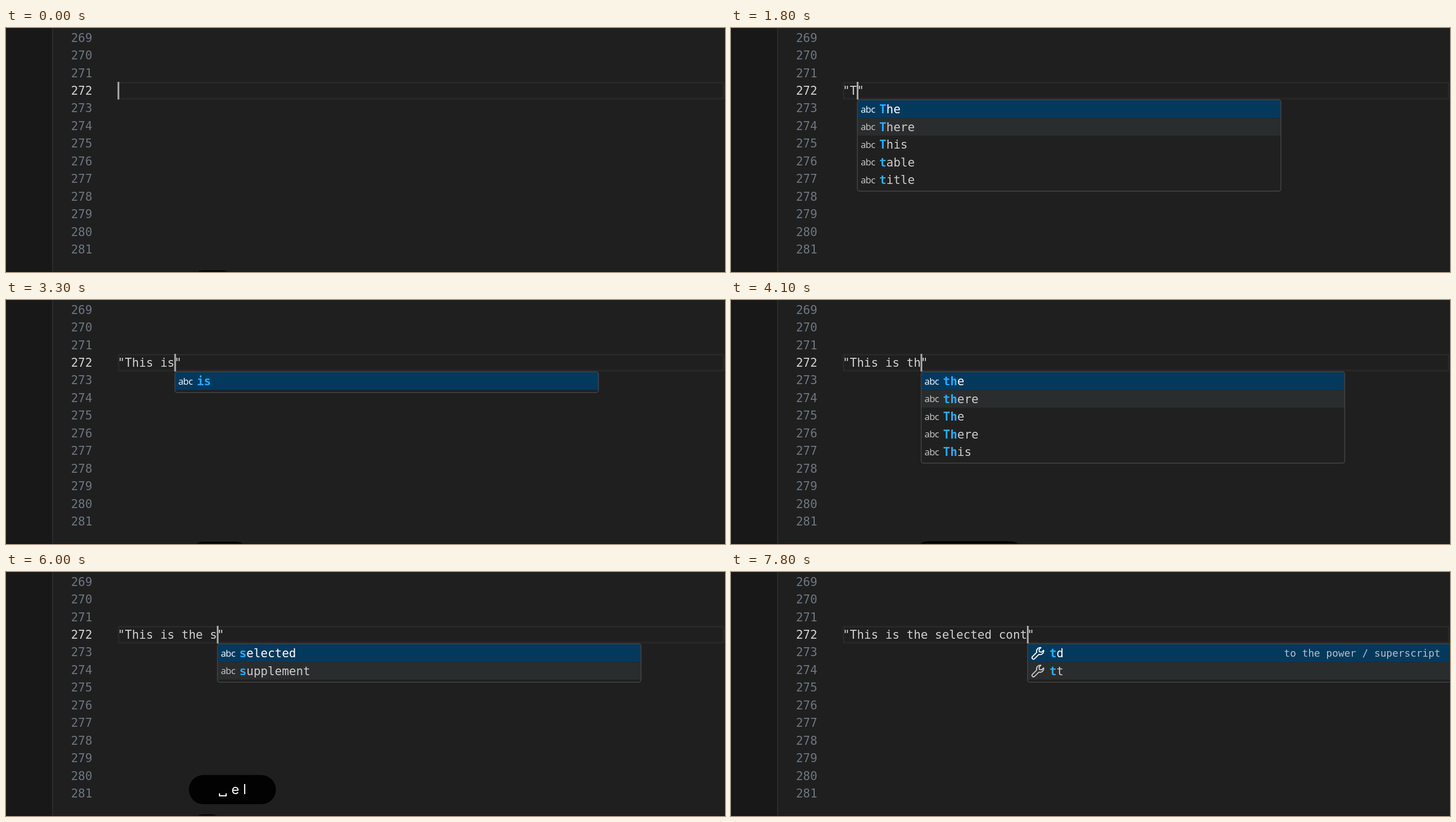
These frames come from a looping animation (1280x435 px, 8 s). An HTML page:

```html
<!DOCTYPE html>
<html lang="en">
<head>
<meta charset="utf-8">
<title>Editor completion</title>
<style>
html, body { margin: 0; width: 100%; height: 100%; overflow: hidden; background: #1f1f1f; }
svg { display: block; width: 100vw; height: 100vh; }
text { white-space: pre; }
.code { font: 20.97px "DejaVu Sans Mono", "Noto Sans CJK SC", "Noto Sans CJK", monospace; }
.abc { font: 16.5px "Open Sans", "Noto Sans", sans-serif; letter-spacing: -.5px; }
.hit { font-weight: bold; fill: #2aaaff; }
.info { font: 17.8px "DejaVu Sans Mono", monospace; fill: #b4c0ca; text-anchor: end; }
.key { font: 24px "Inter", sans-serif; fill: #fff; }
</style>
</head>
<body>
<svg viewBox="0 0 1280 435" preserveAspectRatio="none">
  <rect width="1280" height="435" fill="#1f1f1f"/>
  <rect width="82" height="435" fill="#181818"/>
  <rect x="82" width="2" height="435" fill="#2b2b2b"/>
  <rect x="200.5" y="97.5" width="1077" height="28.5" fill="none" stroke="#282828" stroke-width="3"/>
  <g id="numbers" class="code"></g>
  <text id="line" class="code" x="199" y="119" fill="#d0d0d0"></text>
  <rect id="caret" y="96" width="3" height="31.5" fill="#aeafad"/>
  <g id="popup"></g>
  <g id="keys"></g>
  <rect y="434" width="1280" height="1" fill="#151515"/>
</svg>
<script>
const LOOP = 8000, STEP = 12.625, ROW = 31.46;
const $ = id => document.getElementById(id);
const esc = s => s.replace(/&/g, '&amp;').replace(/</g, '&lt;');

// [time, typed text, suggestions, wrench icons, detail]; square marks show matches as ‹›
const states = [
  [0, null],
  [300, ''],
  [1000, 'Y'],
  [1200, 'Y', '‹y› ‹y›label ‹y›轴标签'],
  [1500, ''],
  [1700, 'T'],
  [1800, 'T', '‹T›he ‹T›here ‹T›his ‹t›able ‹t›itle'],
  [2000, 'Th', '‹Th›e ‹Th›ere ‹Th›is ‹th›e ‹th›ere'],
  [2200, 'Thi', '‹Thi›s'],
  [2400, 'This', '‹This›'],
  [2900, 'This '],
  [3100, 'This i', '‹i›s ‹i›n'],
  [3300, 'This is', '‹is›'],
  [3800, 'This is '],
  [4000, 'This is t', '‹t›he ‹t›here ‹T›he ‹T›here ‹T›his'],
  [4100, 'This is th', '‹th›e ‹th›ere ‹Th›e ‹Th›ere ‹Th›is'],
  [4300, 'This is the', '‹the› ‹the›re ‹The› ‹The›re'],
  [4800, 'This is the '],
  [5000, 'This is the e', '‹e›quation ‹e›lement'],
  [5300, 'This is the el', '‹l›r( ‹l›r[ ‹l›ra ‹l›r{ ‹l›r|', true, 'left( right)'],
  [5600, 'This is the e'],
  [5800, 'This is the '],
  [6000, 'This is the s', '‹s›elected ‹s›upplement'],
  [6100, 'This is the se', '‹se›lected ‹s›uppl‹e›ment'],
  [6200, 'This is the sel', '‹sel›ected ‹s›upp‹le›ment'],
  [6300, 'This is the sele', '‹sele›cted ‹s›upp‹le›m‹e›nt'],
  [6800, 'This is the selected'],
  [7200, 'This is the selected '],
  [7300, 'This is the selected c', '‹c›ontent ‹c›olumn'],
  [7400, 'This is the selected co', '‹co›ntent ‹co›lumn'],
  [7500, 'This is the selected con', '‹con›tent'],
  [7700, 'This is the selected cont', '‹t›d ‹t›t', true, 'to the power / superscript']
];

// [from, to, y, width, label]
const pills = [
  [0, 300, 432, 85], [300, 1600, 362, 66, 'back'], [300, 1600, 432, 79],
  [2900, 3100, 432, 66], [3100, 3800, 431, 110], [3800, 4000, 431, 145], [4000, 4600, 430, 197],
  [4800, 5000, 432, 66], [5000, 5300, 432, 110], [5300, 5600, 432, 155],
  [5600, 6500, 362, 155, '␣ e l'], [5600, 7200, 432, 66]
];

const wrench = (x, y, color) =>
  `<path transform="translate(${x} ${y}) scale(1.6)" fill="none" stroke="${color}" stroke-width="1.15" stroke-linejoin="round"
    d="M11.4 1.6L9.3 3.8l.4 2.5 2.5.4 2.2-2.1A4 4 0 0 1 9.2 9.2L4.3 14A1.6 1.6 0 0 1 2 11.7L6.8 6.8A4 4 0 0 1 11.4 1.6Z"/>`;

const backKey = `<path fill="none" stroke="#fff" stroke-width="2.7" stroke-linejoin="round" stroke-linecap="round"
  d="M355 379H368Q370 379 370 381V395Q370 397 368 397H355L347 388ZM358 384.5l7 7m0-7l-7 7"/>`;

function drawPopup(n, list, tool, detail) {
  if (!list) return '';
  const rows = list.split(' '), x = 199.7 + STEP * n;
  const row = (i, fill) => `<rect x="${x + .7}" y="${128.8 + ROW * i}" width="752.6" height="${ROW}" fill="${fill}"/>`;
  let out = `<rect x="${x}" y="128" width="754" height="${ROW * rows.length + 5.5}" rx="4" fill="#202020"/>` + row(0, '#04395e');
  if (rows[1]) out += row(1, '#2a2d2e');
  rows.forEach((word, i) => {
    const y = 152.2 + ROW * i, color = i ? '#ccc' : '#fff';
    const label = esc(word).replace(/‹/g, '<tspan class="hit">').replace(/›/g, '</tspan>');
    out += tool ? wrench(x + 5.5, y - 20, color)
      : `<text class="abc" x="${x + 6}" y="${y - 1.5}" fill="${color}">abc</text>`;
    out += `<text class="code" x="${x + 39}" y="${y}" fill="${color}">${label}</text>`;
  });
  if (detail) out += `<text class="info" x="${x + 735}" y="151">${detail}</text>`;
  return out + `<rect x="${x}" y="128" width="754" height="${ROW * rows.length + 5.5}" rx="4" fill="none" stroke="#454545" stroke-width="1.5"/>`;
}

function drawPill([, , y, w, label]) {
  const text = label === 'back' ? backKey
    : label ? `<text class="key" x="${325 + w / 2}" y="396" text-anchor="middle">${label}</text>` : '';
  return `<rect x="325.5" y="${y}" width="${w}" height="52" rx="26" fill="#020202"/>` + text;
}

for (let i = 0; i < 13; i++)
  $('numbers').innerHTML += `<text x="115.7" y="${24.6 + ROW * i}" fill="${i === 3 ? '#d4d4d4' : '#6e7681'}">${269 + i}</text>`;

let shown = '';
function render(t) {
  let k = states.length - 1;
  while (states[k][0] > t) k--;
  const [, typed, list, tool, detail] = states[k];
  let first = k;
  while (first && states[first - 1][1] === typed) first--;
  const n = typed === null ? 0 : typed.length + 1;
  const lit = Math.floor((t - states[first][0]) / 500) % 2 === 0;
  const live = pills.filter(p => t >= p[0] && t < p[1]);
  const stamp = k + '/' + lit + '/' + live.map(p => pills.indexOf(p));
  if (stamp === shown) return;
  shown = stamp;
  $('line').textContent = typed === null ? '' : `"${typed}"`;
  $('caret').setAttribute('x', 198.6 + STEP * n);
  $('caret').setAttribute('opacity', lit ? 1 : 0);
  $('popup').innerHTML = drawPopup(n, list, tool, detail);
  $('keys').innerHTML = live.map(drawPill).join('');
}

const start = performance.now();
function tick(now) {
  render(Math.max(0, now - start) % LOOP);
  requestAnimationFrame(tick);
}
render(0);
requestAnimationFrame(tick);
</script>
</body>
</html>
```
